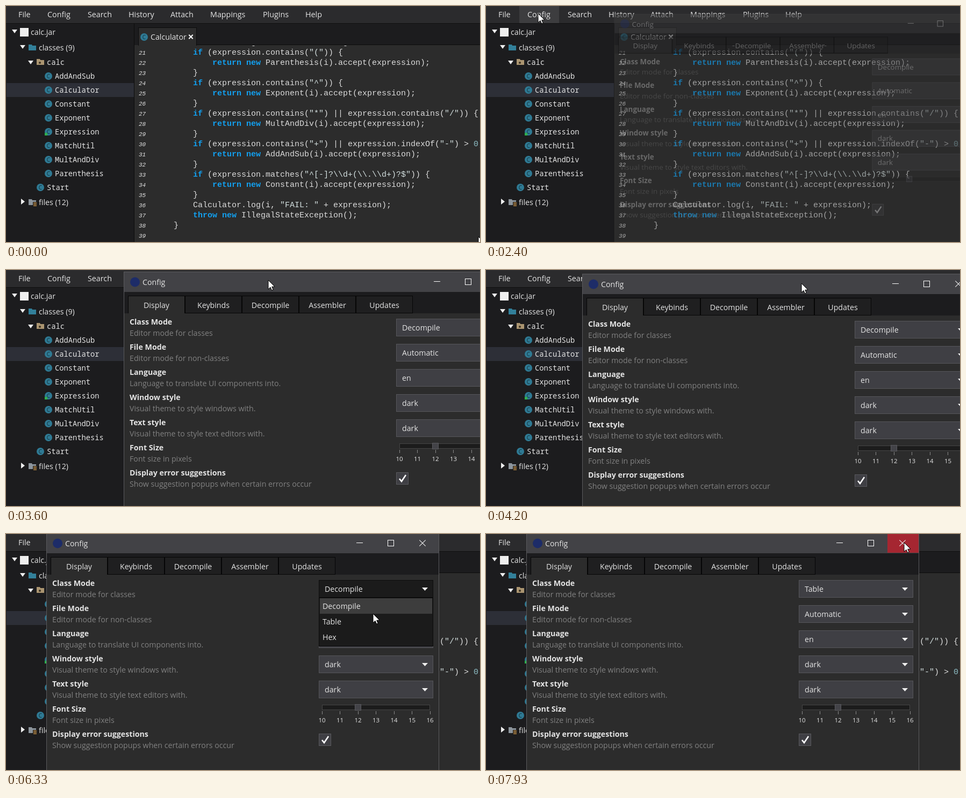
These frames come from a looping animation (882 by 441 pixels, 8000 ms). An HTML page with a canvas:

```html
<!DOCTYPE html>
<html lang="en">
<head>
<meta charset="utf-8">
<title>Config window</title>
<style>
html, body { margin: 0; width: 100%; height: 100%; overflow: hidden; background: #1c1c1e; }
canvas { display: block; }
</style>
</head>
<body>
<canvas id="stage" width="882" height="441"></canvas>
<script>
const ctx = document.getElementById('stage').getContext('2d');
const LOOP = 8000, STEP = 1000 / 15;
const UI = '14.2px "Open Sans", sans-serif';
const TREE = '13.75px "Noto Sans Mono", monospace';
const CODE = '15px "Liberation Mono", monospace';
const DARK = '#1c1c1e', PANEL = '#2c2c2c', LIGHT = '#e4e4e4', GRAY = '#818181';

const menu = [['File', 23], ['Config', 77], ['Search', 152], ['History', 228],
  ['Attach', 306], ['Mappings', 380], ['Plugins', 478], ['Help', 557]];
const classes = ['AddAndSub', 'Calculator', 'Constant', 'Exponent', 'Expression',
  'MatchUtil', 'MultAndDiv', 'Parenthesis'];
const code = String.raw`        if (expression.contains("(")) {
            return new Parenthesis(i).accept(expression);
        }
        if (expression.contains("^")) {
            return new Exponent(i).accept(expression);
        }
        if (expression.contains("*") || expression.contains("/")) {
            return new MultAndDiv(i).accept(expression);
        }
        if (expression.contains("+") || expression.indexOf("-") > 0) {
            return new AddAndSub(i).accept(expression);
        }
        if (expression.matches("^[-]?\\d+(\\.\\d+)?$")) {
            return new Constant(i).accept(expression);
        }
        Calculator.log(i, "FAIL: " + expression);
        throw new IllegalStateException();
    }
`.split('\n');
const settings = [
  ['Class Mode', 'Editor mode for classes', 'Decompile'],
  ['File Mode', 'Editor mode for non-classes', 'Automatic'],
  ['Language', 'Language to translate UI components into.', 'en'],
  ['Window style', 'Visual theme to style windows with.', 'dark'],
  ['Text style', 'Visual theme to style text editors with.', 'dark'],
  ['Font Size', 'Font size in pixels'],
  ['Display error suggestions', 'Show suggestion popups when certain errors occur']];

const linear = u => u, easeIn = u => u * u, easeOut = u => u * (2 - u), smooth = u => u * u * (3 - 2 * u);

// Keyframes: time, x, y, easing on the way there
const mousePath = [[133, 879, 431], [1000, 321, 185, linear], [1800, 97, 14, easeOut],
  [2400, 97, 14], [2467, 97, 16, linear], [2667, 97, 16], [3200, 272, 66, easeIn],
  [3733, 560, 4, linear], [4000, 630, 21, easeOut], [4067, 630, 21], [4200, 587, 25, linear],
  [4400, 477, 14, linear], [4467, 486, 16, linear], [4667, 486, 16], [5067, 628, 86, easeIn],
  [5267, 682, 111, easeOut], [6000, 682, 111], [6333, 683, 149, linear],
  [6533, 686, 166, easeOut], [7067, 686, 166], [7933, 778, 16, smooth]];
const windowPath = [[4067, 144, 5], [4200, 104, 9, linear], [4400, -9, -1, linear], [4467, 0, 0, linear]];

function at(path, t) {
  const i = path.findIndex(k => k[0] > t);
  if (i === 0) return path[0].slice(1, 3);
  if (i < 0) return path[path.length - 1].slice(1, 3);
  const a = path[i - 1], b = path[i];
  const u = (b[3] || linear)((t - a[0]) / (b[0] - a[0]));
  return [1, 2].map(k => Math.round(a[k] + (b[k] - a[k]) * u));
}

function box(x, y, w, h, fill, line) {
  ctx.fillStyle = fill;
  ctx.fillRect(x, y, w, h);
  if (line) {
    ctx.strokeStyle = line;
    ctx.lineWidth = 1;
    ctx.strokeRect(x + .5, y + .5, w - 1, h - 1);
  }
}

function text(s, x, y, font = UI, fill = LIGHT, align = 'left') {
  ctx.font = font;
  ctx.fillStyle = fill;
  ctx.textAlign = align;
  ctx.fillText(s, x, y);
}

function poly(points, fill) {
  ctx.beginPath();
  points.forEach(p => ctx.lineTo(...p));
  ctx.closePath();
  ctx.fillStyle = fill;
  ctx.fill();
}

function lines(color, width, ...paths) {
  ctx.strokeStyle = color;
  ctx.lineWidth = width;
  ctx.beginPath();
  for (const p of paths) p.forEach((q, i) => i ? ctx.lineTo(...q) : ctx.moveTo(...q));
  ctx.stroke();
}

function disc(x, y, r, fill) {
  ctx.beginPath();
  ctx.arc(x, y, r, 0, 7);
  ctx.fillStyle = fill;
  ctx.fill();
}

function cross(x, y, r, color, width) {
  lines(color, width, [[x - r, y - r], [x + r, y + r]], [[x - r, y + r], [x + r, y - r]]);
}

const down = (x, y, w, h) => poly([[x, y], [x + w, y], [x + w / 2, y + h]], '#eee');
const folder = (x, y, fill) => poly([[x, y], [x + 6, y], [x + 7, y + 2], [x + 14, y + 2], [x + 14, y + 11], [x, y + 11]], fill);

function classIcon(x, y) {
  disc(x, y, 7, '#2f7a94');
  text('C', x, y + 3.5, '10px "Open Sans", sans-serif', '#12303c', 'center');
}

function drawTree() {
  box(0, 33, 238, 408, DARK);
  box(1, 144, 237, 26, '#2d2f37');
  down(11, 44, 10, 7);
  box(26, 41, 16, 16, '#eeeeee');
  text('calc.jar', 46, 54);
  down(26, 73, 10, 7);
  folder(42, 72, '#32809a');
  text('classes (9)', 61, 83);
  down(41, 102, 10, 7);
  folder(57, 99, '#ab9571');
  disc(63, 106, 2, '#3b3222');
  text('calc', 76, 110, TREE);
  classes.forEach((name, i) => {
    const y = 131 + 26 * i;
    classIcon(79, y);
    if (name === 'Expression') box(72, y + 2, 5, 5, '#2fae4e');
    text(name, 91, y + 5, TREE);
  });
  classIcon(64, 339);
  text('Start', 76, 344, TREE);
  poly([[28, 360], [35, 365.5], [28, 371]], '#eee');
  folder(42, 361, '#8d959c');
  box(50, 366, 7, 9, DARK);
  for (let y = 367; y < 375; y += 2) box(51, y, 6, 1, '#d29a4a');
  text('files (12)', 61, 372);
}

function drawCode() {
  box(239, 33, 643, 40, DARK);
  box(239, 73, 643, 368, PANEL);
  box(238, 33, 1, 408, '#0c0c0c');
  box(246, 72, 636, 1, '#0c0c0c');
  box(246, 40, 109, 34, PANEL, '#0c0c0c');
  box(247, 72, 107, 2, PANEL);
  classIcon(257, 58);
  text('Calculator', 269, 63);
  cross(344, 57.5, 3.7, '#fff', 2);
  ctx.save();
  ctx.beginPath();
  ctx.rect(239, 74, 643, 367);
  ctx.clip();
  text('g', 456, 72, CODE);
  text('g', 627, 72, CODE);
  code.forEach((line, i) => {
    const y = 91 + 19 * i;
    text(21 + i, 247, y, 'italic 11px "Liberation Mono", monospace');
    for (const m of line.matchAll(/"[^"]*"|\b(?:if|return|new|throw)\b|\b\d+\b|[^\s"]+?(?=\b|["\s]|$)/g)) {
      const word = /^(if|return|new|throw)$/.test(m[0]);
      const fill = word ? '#12a0f0' : m[0][0] === '"' ? '#d3dfdf' : /^\d/.test(m[0]) ? '#8fbfc6' : '#dcdcdc';
      text(m[0], 276 + 9 * m.index, y, (word ? 'bold ' : '') + CODE, fill);
    }
  });
  ctx.restore();
}

function drawMain(mx, my) {
  box(0, 0, 882, 33, '#2b2b2d');
  box(0, 32, 882, 1, '#111');
  if (mx >= 62 && mx < 136 && my < 32) box(62, 0, 74, 32, '#3d3d3f');
  for (const [name, x] of menu) text(name, x, 21, '14.3px "Open Sans", sans-serif');
  drawTree();
  drawCode();
}

function drawSlider(t) {
  box(588, 319, 201, 10, '#1c1c1c', '#454545');
  box(649, 318, 12, 12, '#434348', '#5a5a5e');
  ctx.save();
  ctx.globalAlpha *= Math.min(1, Math.max(0, (t - 2467) / 500));
  for (let i = 0; i < 7; i++) {
    const x = 588 + 33.5 * i;
    box(Math.floor(x), 331, 1, 6, '#8a8a8a');
    text(10 + i, x, 352, '11.5px "Open Sans", sans-serif', LIGHT, 'center');
  }
  ctx.restore();
}

function drawConfig(t, mx, my) {
  const [dx, dy] = at(windowPath, t);
  const x = mx - dx, y = my - dy;
  const open = t >= 5533 && t < 6667;
  ctx.save();
  ctx.translate(dx, dy);
  const shown = Math.min(1, (t - 2334) / 200), size = .92 + .08 * shown;
  ctx.globalAlpha = shown;
  ctx.translate(440, 220);
  ctx.scale(size, size);
  ctx.translate(-440, -220);

  box(75, -2, 731, 482, PANEL, '#5b5b5e');
  box(76, -1, 729, 37, '#424246');
  disc(96, 17.5, 9, '#1d2c68');
  text('Config', 110, 23);
  if (x >= 747 && y < 36) box(747, -1, 58, 36, '#a52631');
  box(652, 16, 12, 1, '#fff');
  ctx.strokeStyle = '#fff';
  ctx.lineWidth = 1;
  ctx.strokeRect(710.5, 11.5, 11, 11);
  cross(775, 17, 5.7, '#eee', 1.1);

  box(76, 36, 729, 40, DARK);
  box(83, 75, 530, 1, '#060606');
  ['Display', 'Keybinds', 'Decompile', 'Assembler', 'Updates'].forEach((name, i) => {
    const left = 83 + 106 * i;
    box(left, 43, 106, 33, i ? '#1f1f20' : PANEL, '#060606');
    if (!i) box(left + 1, 74, 104, 2, PANEL);
    text(name, left + 53, 66, UI, LIGHT, 'center');
  });

  settings.forEach(([name, note, value], i) => {
    const top = 86 + 47 * i;
    text(name, 86, top + 11, 'bold ' + UI);
    text(note, 86, top + 32, UI, GRAY);
    if (!value) return;
    const hover = x > 582 && x < 795 && y > top && y < top + 33;
    const dark = open ? !i : hover;
    box(582, top, 213, 33, dark ? '#1b1b1b' : '#3f3f44', dark ? '#0c0c0c' : '#56565a');
    text(!i && t >= 6667 ? 'Table' : value, 593, top + 22);
    down(774, top + 14, 11, 6);
  });
  drawSlider(t);
  box(582, 373, 23, 23, '#3f3f44', '#5a5a5e');
  lines('#fff', 2.6, [[588, 385], [592, 390], [600, 378]]);

  if (open) {
    ctx.globalAlpha = Math.min(1, (t - 5466) / 200);
    box(582, 119, 213, 91, '#1b1b1b', '#0a0a0a');
    ['Decompile', 'Table', 'Hex'].forEach((name, i) => {
      const top = 120 + 29 * i;
      if (i === (y < 150 ? 0 : 1)) box(584, top, 209, 29, '#3d3d3d');
      text(name, 589, top + 20);
    });
  }
  ctx.restore();
}

function drawCursor(x, y) {
  ctx.save();
  ctx.translate(x, y);
  poly([[0, 0], [0, 17], [4, 13.3], [6.6, 19], [9.2, 18], [6.7, 12.3], [12, 12]], '#fff');
  ctx.strokeStyle = '#000';
  ctx.lineWidth = 1;
  ctx.stroke();
  ctx.restore();
}

function draw(now) {
  const t = Math.floor((now % LOOP + 4) / STEP) * STEP + .5;
  const [mx, my] = at(mousePath, t);
  drawMain(mx, my);
  if (t >= 2400) drawConfig(t, mx, my);
  drawCursor(mx, my);
  requestAnimationFrame(draw);
}
requestAnimationFrame(draw);
</script>
</body>
</html>
```
